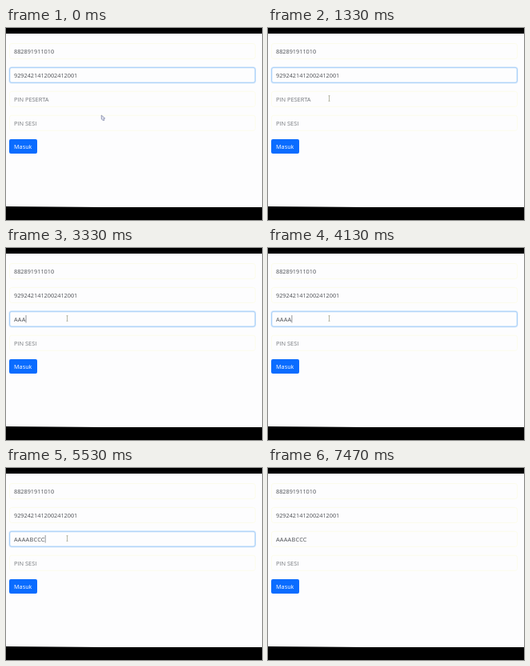
Write an HTML page that moves like this. It is 320 px wide and 240 px high and loops after 8800 ms.

```html
<!DOCTYPE html>
<html lang="id">
<head>
<meta charset="utf-8">
<title>Form masuk</title>
<style>
  html, body { margin: 0; width: 100%; height: 100%; overflow: hidden; background: #000; }
  svg { display: block; width: 320px; height: 240px; }
  text { font: 7.3px "Open Sans", "Noto Sans", sans-serif; fill: #4c4f53; }
  .hint { font-size: 7.4px; fill: #75787c; }
  .button { font-weight: 500; fill: #fff; }
</style>
</head>
<body>
<svg id="stage" viewBox="0 0 320 240">
  <path d="M0 7H320V224H120L0 223Z" fill="#fdfdfe"/>
  <g id="fields"></g>
  <rect x="4" y="139" width="35" height="18" rx="2" fill="#0a6cff"/>
  <text class="button" x="10" y="151">Masuk</text>
  <rect id="caret" y="84" width="0.8" height="9.5" fill="#777b80"/>
  <path id="arrow" d="M-1.8 -3L2.8 1L0.8 1.4L1.8 3.4L0.4 3.5L-1.6 2Z" fill="#e4e6f2" stroke="#7f86a6" stroke-width="0.8"/>
  <path id="beam" d="M-1 -3.3H1M0 -3.3V3.3M-1 3.3H1" fill="none" stroke="#a3a58f" stroke-width="0.8"/>
</svg>
<script>
const LOOP = 8800;
const FOCUS = 1430, BLUR = 7150, FADE = 150, BLINK = 500;
const MOVE = { start: 70, end: 820, from: [121, 112], to: [76.5, 88] };
const WORD = "AAAABCCC";
const KEYS = [2370, 2970, 3170, 3930, 4600, 5070, 5210, 5370];

const $ = id => document.getElementById(id);
const clamp = v => Math.min(1, Math.max(0, v));
const ease = v => v * v * (3 - 2 * v);
const progress = (t, start, length) => ease(clamp((t - start) / length));
const show = (el, on) => el.setAttribute("visibility", on ? "visible" : "hidden");

function add(tag, attrs, parent) {
  const el = document.createElementNS("http://www.w3.org/2000/svg", tag);
  for (const key in attrs) el.setAttribute(key, attrs[key]);
  return parent.appendChild(el);
}

function makeField(value, row, isHint) {
  const y = 19.5 + row * 29.9;
  const box = { x: 4.5, y, width: 307, height: 19, rx: 2.5, fill: "none" };
  const group = $("fields");
  add("rect", { ...box, stroke: "#fcfce6", "stroke-width": 0.8 }, group);
  const ring = add("g", { opacity: 0 }, group);
  add("rect", { ...box, stroke: "#e0eefd", "stroke-width": 2.4 }, ring);
  add("rect", { ...box, stroke: "#a9d0f8", "stroke-width": 1 }, ring);
  const label = add("text", { x: 10, y: y + 12.6 }, group);
  label.textContent = value;
  if (isHint) label.setAttribute("class", "hint");
  return { ring, label };
}

const fields = [
  makeField("882891911010", 0),
  makeField("9292421412002412001", 1),
  makeField("PIN PESERTA", 2, true),
  makeField("PIN SESI", 3, true)
];
const entry = fields[2].label;

function drawEntry(t) {
  const count = KEYS.filter(k => k <= t).length;
  entry.textContent = count ? WORD.slice(0, count) : "PIN PESERTA";
  entry.setAttribute("class", count ? "" : "hint");
  entry.setAttribute("letter-spacing", count ? 0.25 : 0);

  // Each key press restarts the caret's blink.
  const since = t - (count ? KEYS[count - 1] : FOCUS);
  const lit = Math.floor(since / BLINK) % 2 === 0;
  $("caret").setAttribute("x", count ? 10 + entry.getComputedTextLength() : 9.6);
  show($("caret"), t >= FOCUS && t < BLUR && lit);
}

function drawPointer(t) {
  const p = progress(t, MOVE.start, MOVE.end - MOVE.start);
  const [x, y] = MOVE.from.map((v, i) => v + (MOVE.to[i] - v) * p);
  const inside = y < 98;
  for (const id of ["arrow", "beam"]) {
    $(id).setAttribute("transform", `translate(${x} ${y})`);
    show($(id), t < BLUR && inside === (id === "beam"));
  }
}

function draw(t) {
  const gained = progress(t, FOCUS, FADE);
  fields[1].ring.setAttribute("opacity", 1 - gained);
  fields[2].ring.setAttribute("opacity", gained - progress(t, BLUR, FADE));
  drawEntry(t);
  drawPointer(t);
}

const begin = performance.now();
function tick() {
  draw((performance.now() - begin) % LOOP);
  requestAnimationFrame(tick);
}
tick();
</script>
</body>
</html>
```
